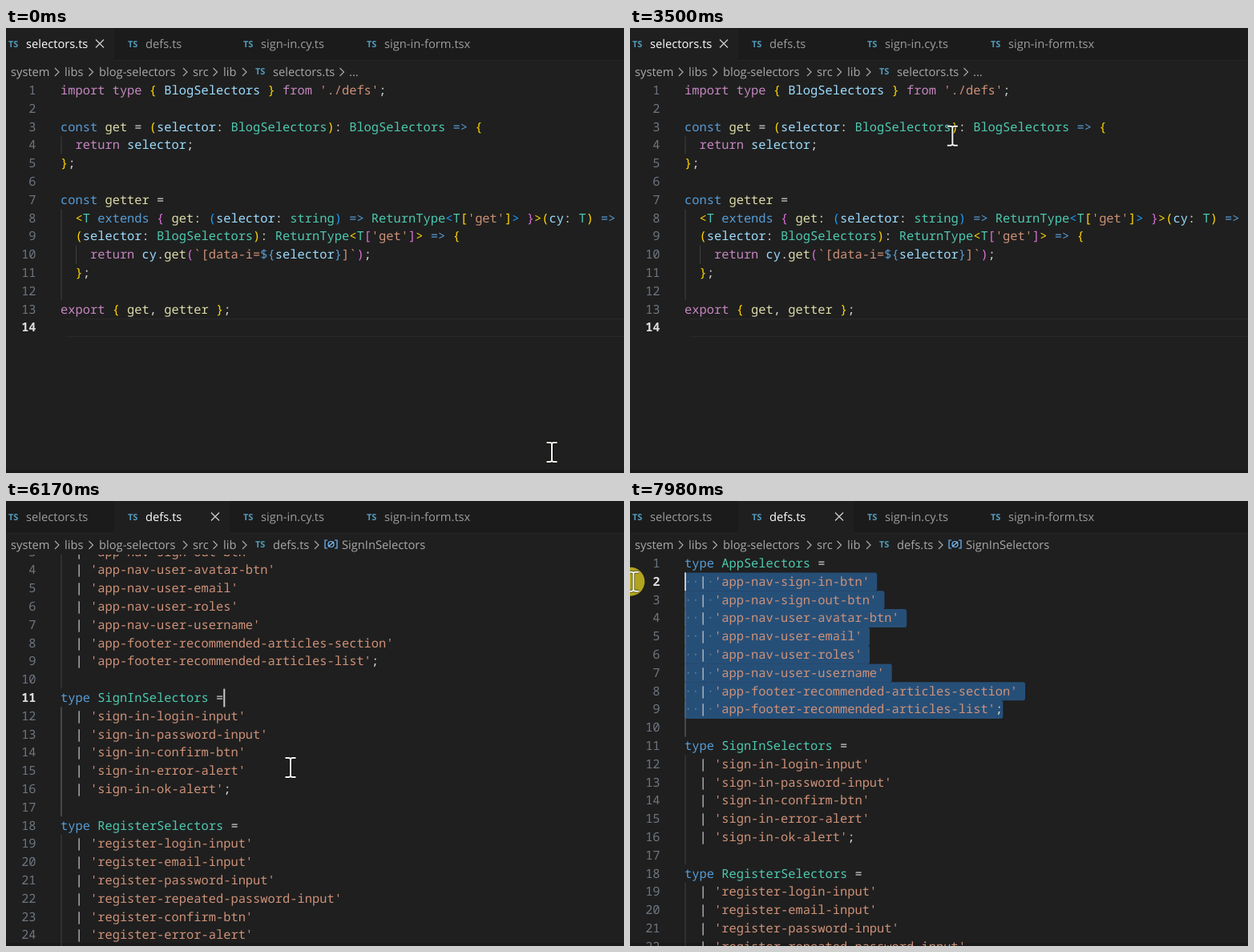
An HTML page for the animation above (8000 ms loop, 771 by 556 pixels).

```html
<!DOCTYPE html>
<html lang="en">
<head>
<meta charset="utf-8">
<title>Selectors editor</title>
<style>
html, body { margin: 0; width: 100%; height: 100%; overflow: hidden; background: #1f1f1f; }
svg { display: block; width: 771px; height: 556px; }
text { white-space: pre; text-rendering: geometricPrecision; }
.code { font: 15.4px "Noto Sans Mono", "DejaVu Sans Mono", monospace; font-variant-ligatures: none; }
.ui { font: 14.7px "Open Sans", "Noto Sans", sans-serif; }
.ts { font: 700 11px "Open Sans", "Noto Sans", sans-serif; fill: #519aba; }
.num { fill: #6e7681; text-anchor: end; }
.num.on { fill: #dddddd; font-weight: 600; }
</style>
</head>
<body>
<svg id="stage" viewBox="0 0 771 556"></svg>
<script>
const LOOP = 8000, W = 9.24, H = 22.8, LEFT = 68, TOP = 66.6;
const OPEN = 4880, PRESS = 7290, LAG = 60;
const COLORS = {
  d: '#d4d4d4', k: '#c586c0', b: '#569cd6', f: '#dcdcaa', t: '#4ec9b0',
  v: '#9cdcfe', s: '#ce9178', g: '#ffd700', m: '#da70d6', u: '#179fff'
};

// "~x" starts a run of text in colour x
const getterCode = [
  "~kimport type ~g{ ~vBlogSelectors ~g} ~kfrom ~s'./defs'~d;",
  '',
  '~bconst ~fget ~d= ~g(~vselector~d: ~tBlogSelectors~g)~d: ~tBlogSelectors ~b=> ~g{',
  '  ~kreturn ~vselector~d;',
  '~g}~d;',
  '',
  '~bconst ~fgetter ~d=',
  "  ~g<~tT ~bextends ~m{ ~fget~d: ~u(~vselector~d: ~tstring~u) ~b=> ~tReturnType~u<~tT~g[~s'get'~g]~u> ~m}~g>(~vcy~d: ~tT~g) ~b=>",
  "  ~g(~vselector~d: ~tBlogSelectors~g)~d: ~tReturnType~g<~tT~m[~s'get'~m]~g> ~b=> ~g{",
  '    ~kreturn ~vcy~d.~fget~m(~s`[data-i=~b${~vselector~b}~s]`~m)~d;',
  '  ~g}~d;',
  '',
  '~kexport ~g{ ~fget~d, ~fgetter ~g}~d;',
  ''
];
const tipCode = [
  '~bconst ~fgetter~d: ~g<~tT ~bextends ~m{',
  '    ~fget~d: ~u(~vselector~d: ~tstring~u) ~b=> ~tReturnType~u<~tT~g[~s"get"~g]~u>~d;',
  '~m}~g>(~vcy~d: ~tT~g) ~b=> ~g(~vselector~d: ~tBlogSelectors~g) ~b=> ~tReturnType~g<~tT~m[~s"get"~m]~g>'
];
const union = (name, prefix, items) => [
  `~btype ~t${name} ~d=`,
  ...items.split(' ').map((s, i, all) =>
    `  ~d| ~s'${prefix}-${s}'` + (i === all.length - 1 ? '~d;' : '')),
  ''
];
const defsCode = [
  ...union('AppSelectors', 'app', 'nav-sign-in-btn nav-sign-out-btn nav-user-avatar-btn nav-user-email ' +
    'nav-user-roles nav-user-username footer-recommended-articles-section footer-recommended-articles-list'),
  ...union('SignInSelectors', 'sign-in', 'login-input password-input confirm-btn error-alert ok-alert'),
  ...union('RegisterSelectors', 'register', 'login-input email-input password-input ' +
    'repeated-password-input confirm-btn error-alert ok-alert'),
  '~btype ~tBlogSelectors ~d= ~tAppSelectors ~d| ~tSignInSelectors ~d| ~tRegisterSelectors~d;',
  '',
  '~kexport type ~g{ ~vBlogSelectors ~g}~d;'
];
const lengths = defsCode.map(s => s.replace(/~./g, '').length);

const stage = document.getElementById('stage');
function add(parent, tag, attrs = {}, label) {
  const el = document.createElementNS('http://www.w3.org/2000/svg', tag);
  for (const key in attrs) el.setAttribute(key, attrs[key]);
  if (label !== undefined) el.textContent = label;
  parent.append(el);
  return el;
}
const set = (el, attrs) => { for (const key in attrs) el.setAttribute(key, attrs[key]); };
const show = (el, on) => { el.style.display = on ? '' : 'none'; };
const rect = (p, x, y, width, height, fill, more) => add(p, 'rect', { x, y, width, height, fill, ...more });
const line = (p, d, stroke, width = 1) =>
  add(p, 'path', { d, stroke, 'stroke-width': width, fill: 'none' });
const rowTop = i => TOP + i * H;
const colX = c => LEFT + c * W;

function codeLine(parent, src, x, y) {
  const el = add(parent, 'text', { class: 'code', x, y });
  src.split('~').forEach((run, i) => {
    if (i) add(el, 'tspan', { fill: COLORS[run[0]] }, run.slice(1));
    else if (run) add(el, 'tspan', {}, run);
  });
}
function guide(parent, from, to, col = 0, color = '#404040') {
  return rect(parent, colX(col) + 0.5, rowTop(from - 1), 1, (to - from + 1) * H, color);
}
function codePage(parent, lines) {
  return lines.map((src, i) => {
    const y = rowTop(i) + 16.4;
    codeLine(parent, src, LEFT, y);
    return add(parent, 'text', { class: 'code num', x: 37.6, y }, i + 1);
  });
}

rect(stage, 0, 0, 771, 556, '#1f1f1f');
rect(stage, 0, 552, 771, 4, '#1a1a1a');

// First file
const page1 = add(stage, 'g');
line(page1, 'M75 363.5H771M75 385.5H771', '#292929');
const wordMark = rect(page1, colX(6), rowTop(6), 6 * W, H, '#264f78', { opacity: 0.4 });
guide(page1, 4, 4);
guide(page1, 8, 12);
guide(page1, 10, 10, 2);
codePage(page1, getterCode)[13].classList.add('on');

// Second file
const page2 = add(stage, 'g');
const marks = lengths.slice(0, 9).map((n, i) => ({
  box: rect(page2, 0, rowTop(i), 0, H + 0.3, '#264f78', { rx: 3 }),
  dots: add(page2, 'text', { class: 'code', x: LEFT, y: rowTop(i) + 16.4, fill: '#e3e4e2', opacity: 0.3 }, '·· ·')
}));
const appGuide = guide(page2, 2, 10);
const signGuide = guide(page2, 12, 17);
guide(page2, 19, 26);
const numbers = codePage(page2, defsCode);
const caret = rect(page2, 0, 0, 2, H, '#c8c8c8');

// Tabs and path bar
const header = add(stage, 'g');
rect(header, 0, 0, 771, 67, '#1f1f1f');
rect(header, 0, 0, 771, 41, '#1b1b1b');
const cross = (p, x) => line(p, `M${x - 5} 14.5l10 10m0-10l-10 10`, '#cccccc', 1.3);
const tabs = [
  ['selectors.ts', 0, 135, 25, 117], ['defs.ts', 135, 144, 174, 261],
  ['sign-in.cy.ts', 279, 154, 318, 415], ['sign-in-form.tsx', 433, 170, 472, 0]
].map(([name, x, w, tx, closeX]) => {
  const back = rect(header, x, 0, w, 41, '#1f1f1f');
  add(header, 'text', { class: 'ts', x: tx - 22, y: 23.6 }, 'TS');
  const label = add(header, 'text', { class: 'ui', x: tx, y: 25 }, name);
  return { back, label, close: cross(header, closeX) };
});
const underline = line(header, '', '#262626');

const pathText = (p, x, s) => add(p, 'text', { class: 'ui', x, y: 59.5, fill: '#a9a9a9' }, s);
const chevron = (p, x) => line(p, `M${x - 2.5} 50l5 5l-5 5`, '#a9a9a9', 1.2);
[[6, 'system'], [73, 'libs'], [116, 'blog-selectors'], [233, 'src'], [271, 'lib']]
  .forEach(([x, s]) => pathText(header, x, s));
[63.5, 106, 223.5, 261, 297.5].forEach(x => chevron(header, x));
add(header, 'text', { class: 'ts', x: 311, y: 58.2 }, 'TS');
const path1 = add(header, 'g'), path2 = add(header, 'g');
pathText(path1, 333, 'selectors.ts');
chevron(path1, 419);
pathText(path1, 428, '...');
pathText(path2, 333, 'defs.ts');
chevron(path2, 387.5);
line(path2, 'M401 49h-3v10h3M410 49h3v10h-3', '#75beff', 1.2);
line(path2, 'M402 54a3.5 3.5 0 1 0 7 0a3.5 3.5 0 1 0 -7 0M402 57l7-6', '#75beff', 1.2);
pathText(path2, 419, 'SignInSelectors');

// Type hint
const tip = add(stage, 'g');
rect(tip, 123.5, 124.5, 593, 79, '#202020', { stroke: '#454545', rx: 3 });
tipCode.forEach((src, i) => codeLine(tip, src, 134, 146 + i * H));

// Pointer
const ring = add(stage, 'circle', { r: 18, fill: '#ffeb1e', opacity: 0.65 });
const beam = add(stage, 'g'), hand = add(stage, 'g');
const beamPath = 'M-6.5-12h4.5l2 1l2-1h4.5M0-11V11M-6.5 12h4.5l2-1l2 1h4.5';
line(beam, beamPath, 'rgba(0,0,0,.55)', 3.6);
line(beam, beamPath, '#f4f4ee', 2);
add(hand, 'path', {
  d: 'M-5 1a3 3 0 0 1 6 0v9q0-2 2.5-1.6t2 2.2q.5-1.4 2.3-.8t1.7 2.2q2.5-1 2.5 1.8v5q0 3-2.5 6v3.5h-12.5v-3l-7-9q-2-3 .5-4t5 3z',
  fill: '#ffffff', stroke: '#000000', 'stroke-width': 0.8
});
line(hand, 'M1 10v5M5.5 11v4M9.5 12v3.5', '#555555', 0.8);

// Pointer track: time, x, y
const track = [
  [0, 681, 530], [20, 681, 530], [95, 530, 490], [170, 413, 471], [380, 413, 471],
  [500, 375, 503], [680, 200, 450], [780, 164, 390], [1000, 280, 329], [1180, 438, 350],
  [1300, 481, 390], [1520, 422, 432], [1720, 300, 390], [1990, 169, 250], [2080, 165, 228],
  [2150, 151, 210], [3110, 151, 210], [3230, 205, 223], [3360, 310, 195], [3500, 402, 135],
  [3700, 424, 70], [3860, 400, 26], [4200, 300, 24], [4500, 205, 23], [4990, 205, 23],
  [5350, 310, 260], [5620, 355, 333], [6470, 355, 333], [6900, 450, 248], [7270, 486, 253],
  [7330, 486, 253], [7500, 425, 240], [7680, 304, 211], [7800, 150, 150], [7900, 30, 105], [8000, 4, 101]
];
function slope(i, k) {
  const a = track[i - 1], b = track[i], c = track[i + 1];
  if (!a || !c || a[k] === b[k] || b[k] === c[k] || (b[k] - a[k]) * (c[k] - b[k]) < 0) return 0;
  return (c[k] - a[k]) / (c[0] - a[0]);
}
function pointer(t) {
  let i = 0;
  while (i < track.length - 2 && t >= track[i + 1][0]) i++;
  const a = track[i], b = track[i + 1], span = b[0] - a[0], u = (t - a[0]) / span;
  return [1, 2].map(k => {
    const s = u * u * (3 - 2 * u);
    return a[k] + (b[k] - a[k]) * s
      + span * u * (1 - u) * ((1 - u) * slope(i, k) - u * slope(i + 1, k));
  });
}

// Wheel notches of 60 px, each eased over a short time
const notches = [5660, 5940, 6290];
const clamp = (v, a = 0, b = 1) => Math.min(b, Math.max(a, v));
const scrollAt = t => notches.reduce((y, n) => y - 60 * (1 - (1 - clamp((t - n) / 130)) ** 2), 180);

function drawTabs(t, x, y) {
  const active = t < OPEN ? 0 : 1;
  const over = y < 41 ? (x < 135 ? 0 : x < 279 ? 1 : x < 433 ? 2 : 3) : -1;
  tabs.forEach((tab, i) => {
    const on = i === active;
    show(tab.back, on || i === over);
    show(tab.close, on || (i === over && i < 3));
    tab.label.style.fill = on ? '#ffffff' : '#9d9d9d';
  });
  underline.setAttribute('d', active ? 'M0 40.5H135M279 40.5H771' : 'M135 40.5H771');
}

function drawDefs(t) {
  let row = 10, col = 22;
  const drag = t >= PRESS;
  if (drag) {
    const [x, y] = pointer(Math.max(PRESS, t - LAG));
    row = clamp(Math.floor((y - TOP) / H), 0, 8);
    col = clamp(Math.round((x - LEFT) / W), 0, lengths[row]);
  }
  marks.forEach(({ box, dots }, i) => {
    const from = i === row ? col : 0;
    const to = lengths[i] + (i < 8 ? 1 : 0);
    const on = drag && i >= row && to > from;
    show(box, on);
    show(dots, on && from === 0);
    if (on) set(box, { x: colX(from), width: (to - from) * W });
  });
  numbers.forEach((n, i) => n.classList.toggle('on', i === row));
  appGuide.setAttribute('fill', drag ? '#707070' : '#404040');
  signGuide.setAttribute('fill', drag ? '#404040' : '#707070');
  set(caret, { x: colX(col), y: rowTop(row) });
  show(caret, drag || (t - OPEN) % 1000 < 500);
  page2.setAttribute('transform', `translate(0 ${-scrollAt(t)})`);
}

function draw(t) {
  const [x, y] = pointer(t);
  const first = t < OPEN, onBar = y < 66;
  show(page1, first);
  show(path1, first);
  show(page2, !first);
  show(path2, !first);
  drawTabs(t, x, y);
  if (!first) drawDefs(t);

  const hint = t < 3250 ? clamp((t - 2440) / 120) : 0;
  show(tip, hint > 0);
  show(wordMark, hint > 0);
  tip.setAttribute('opacity', hint);

  show(hand, onBar);
  show(beam, !onBar);
  (onBar ? hand : beam).setAttribute('transform', `translate(${x} ${y})`);
  show(ring, (t >= 4820 && t < 4960) || t >= PRESS);
  set(ring, { cx: onBar ? x : x - 4, cy: y });
}

const start = performance.now();
function tick() {
  draw((performance.now() - start) % LOOP);
  requestAnimationFrame(tick);
}
tick();
</script>
</body>
</html>
```
